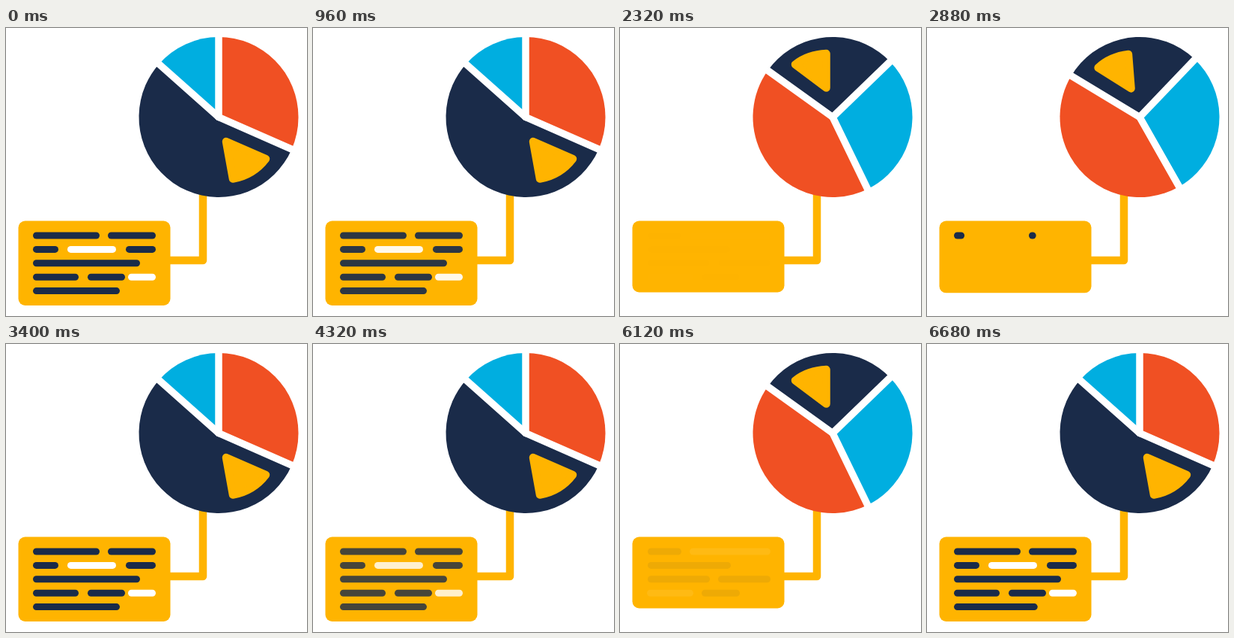
An HTML page with a canvas that plays this animation: 402 by 383 pixels, repeating every 6720 ms.

```html
<!DOCTYPE html>
<html lang="en">
<head>
<meta charset="utf-8">
<title>Pie chart and notes</title>
<style>
  html, body { margin: 0; width: 100%; height: 100%; overflow: hidden; background: #fff; }
  canvas { display: block; width: 402px; height: 383px; }
</style>
</head>
<body>
<canvas id="stage"></canvas>
<script>
const W = 402, H = 383, LOOP = 6720;
const START = 415, HALF = 5000 / 3;   // first change, time between changes
const BLINK = 250, GONE = 750;        // half a blink, moment the text is gone
const NAVY = '#1a2b49', ORANGE = '#f05023', CYAN = '#00aee0', YELLOW = '#ffb400', WHITE = '#fff';
const CX = 284, CY = 118.5, R = 106.5;

const canvas = document.getElementById('stage');
const ctx = canvas.getContext('2d');
const dpr = window.devicePixelRatio || 1;
canvas.width = W * dpr;
canvas.height = H * dpr;

// cuts: orange/navy, navy/cyan, cyan/orange in degrees
// wedge: tip, inner-edge corner, arc control, other corner
// bars: row, left, right, white?
const poses = [
  {
    cuts: [23.6, 221.5, 270],
    wedge: [[294, 151], [347, 174], [330, 196], [303, 200.5]],
    bottom: 369,
    end: 1335,
    bars: [
      [0, 36, 125], [0, 136, 200],
      [1, 36, 70], [1, 82, 147, 1], [1, 160, 200],
      [2, 36, 179],
      [3, 36, 97], [3, 109, 159], [3, 163, 200, 1],
      [4, 36, 152]
    ]
  },
  {
    cuts: [215.6, 316.1, 424],
    wedge: [[275.5, 79.5], [234, 48.5], [251, 35], [275.5, 34]],
    bottom: 351.5,
    end: 1305,
    bars: [
      [0, 37, 82], [0, 93, 201, 1],
      [1, 37, 148],
      [2, 37, 120], [2, 131, 201],
      [3, 36, 98, 1], [3, 109, 160]
    ]
  }
];

const rad = deg => deg * Math.PI / 180;
const mix = (a, b, p) => a + (b - a) * p;
const clamp = p => Math.max(0, Math.min(1, p));
const ease = p => (1 - Math.cos(Math.PI * clamp(p))) / 2;

function spin([x, y], deg) {
  const c = Math.cos(rad(deg)), s = Math.sin(rad(deg));
  return [x * c - y * s, x * s + y * c];
}

// wedge corners measured in the frame of the orange/navy cut
for (const pose of poses) {
  pose.local = pose.wedge.map(([x, y]) => spin([x - CX, y - CY], -pose.cuts[0]));
}

function drawBox(bottom) {
  ctx.strokeStyle = ctx.fillStyle = YELLOW;
  ctx.lineWidth = 10.5;
  ctx.lineJoin = 'round';
  ctx.lineCap = 'butt';
  ctx.beginPath();
  ctx.moveTo(263, 215);
  ctx.lineTo(263, 309);
  ctx.lineTo(215, 309);
  ctx.stroke();

  const x = 16.5, y = 256.5, r = 9, right = 219.5;
  ctx.beginPath();
  ctx.moveTo(x + r, y);
  ctx.arcTo(right, y, right, bottom, r);
  ctx.arcTo(right, bottom, x, bottom, r);
  ctx.arcTo(x, bottom, x, y, r);
  ctx.arcTo(x, y, right, y, r);
  ctx.fill();
}

function drawBars(bars, alpha, grow) {
  ctx.globalAlpha = alpha;
  ctx.lineWidth = 9;
  ctx.lineCap = 'round';
  bars.forEach(([row, left, right, white], i) => {
    const p = grow(i / (bars.length - 1));
    if (p <= 0) return;
    const y = 276 + row * 18.4;
    ctx.strokeStyle = white ? WHITE : NAVY;
    ctx.beginPath();
    ctx.moveTo(left + 4.5, y);
    ctx.lineTo(left + 4.5 + (right - left - 9) * p, y);
    ctx.stroke();
  });
  ctx.globalAlpha = 1;
}

function drawPie(p) {
  const [a, b] = poses;
  const cuts = a.cuts.map((deg, i) => mix(deg, b.cuts[i], p));

  [NAVY, CYAN, ORANGE].forEach((color, i) => {
    const to = i < 2 ? cuts[i + 1] : cuts[0] + 360;
    ctx.fillStyle = color;
    ctx.beginPath();
    ctx.moveTo(CX, CY);
    ctx.arc(CX, CY, R, rad(cuts[i]), rad(to));
    ctx.fill();
  });

  ctx.strokeStyle = WHITE;
  ctx.lineWidth = 9.5;
  ctx.lineCap = 'round';
  ctx.save();
  ctx.beginPath();
  ctx.arc(CX, CY, R + 0.8, 0, 2 * Math.PI);
  ctx.clip();
  for (const deg of cuts) {
    ctx.beginPath();
    ctx.moveTo(CX, CY);
    ctx.lineTo(CX + 115 * Math.cos(rad(deg)), CY + 115 * Math.sin(rad(deg)));
    ctx.stroke();
  }
  ctx.restore();

  const pts = a.local.map((pt, i) => {
    const [x, y] = spin(pt.map((v, j) => mix(v, b.local[i][j], p)), cuts[0]);
    return [CX + x, CY + y];
  });
  ctx.fillStyle = ctx.strokeStyle = YELLOW;
  ctx.lineWidth = 10.5;
  ctx.lineJoin = 'round';
  ctx.beginPath();
  ctx.moveTo(...pts[0]);
  ctx.lineTo(...pts[1]);
  ctx.quadraticCurveTo(...pts[2], ...pts[3]);
  ctx.closePath();
  ctx.fill();
  ctx.stroke();
}

function draw(t) {
  const step = Math.floor((t - START) / HALF);
  const u = step < 0 ? HALF : t - START - step * HALF;
  const from = Math.abs(step % 2), to = 1 - from;

  ctx.setTransform(dpr, 0, 0, dpr, 0, 0);
  ctx.fillStyle = WHITE;
  ctx.fillRect(0, 0, W, H);

  const turn = ease((u - GONE) / 500);
  const resize = ease((u - GONE) / 350);
  drawBox(mix(poses[from].bottom, poses[to].bottom, resize));

  if (u < GONE) {
    drawBars(poses[from].bars, (1 + Math.cos(Math.PI * u / BLINK)) / 2, () => 1);
  } else {
    const span = 305, last = poses[from].end - span;
    drawBars(poses[to].bars, 1, k => ease((u - mix(GONE, last, k)) / span));
  }
  drawPie(mix(from, to, turn));
}

const begin = performance.now();
function tick() {
  draw((performance.now() - begin) % LOOP);
  requestAnimationFrame(tick);
}
tick();
</script>
</body>
</html>
```
